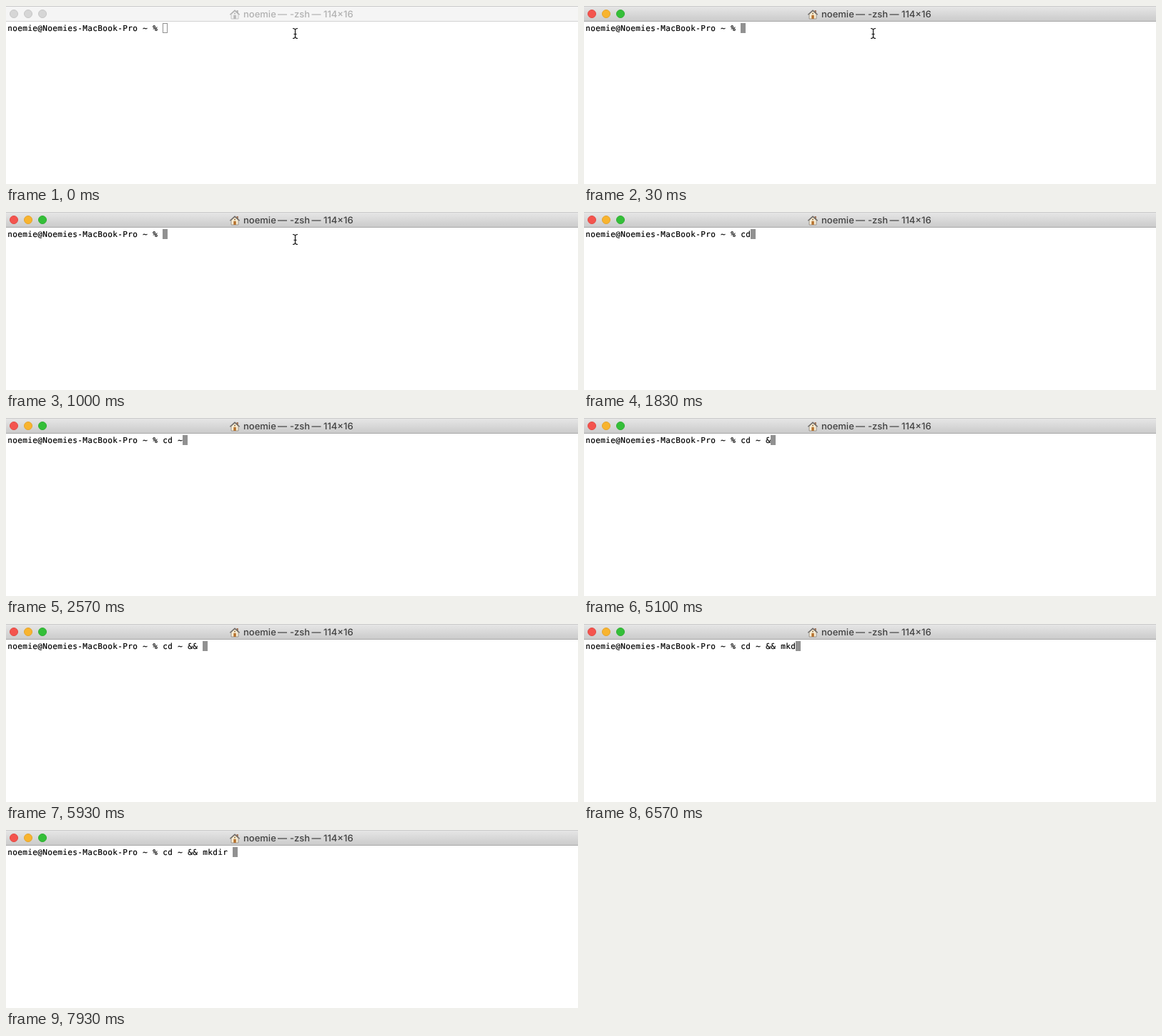
Recreate the animation shown at these times as an HTML page. Size 800 by 250 pixels, loop 8000 ms.

```html
<!DOCTYPE html>
<html lang="en">
<head>
<meta charset="utf-8">
<title>Terminal</title>
<style>
  html, body { margin: 0; height: 100%; overflow: hidden; background: #fff; }
  svg { display: block; text-rendering: geometricPrecision; }
  .title { font: 500 13px Inter, "Liberation Sans", sans-serif; fill: #414141; }
  .line {
    font: 11px "DejaVu Sans Mono", monospace; letter-spacing: .378px;
    white-space: pre; fill: #000; stroke: #000; stroke-width: .2;
  }
  #cursor { fill: #919191; stroke: #919191; }
  .inactive .bar { fill: #f5f5f5; }
  .inactive .edge { fill: #d2d2d2; }
  .inactive .title { fill: #b1b1b1; }
  .inactive .light { fill: #d6d6d6; stroke: #c6c6c6; }
  .inactive .icon { filter: grayscale(1); opacity: .5; }
  .inactive #cursor { fill: #fff; }
</style>
</head>
<body>
<svg id="stage" width="800" height="250" viewBox="0 0 800 250">
  <defs>
    <linearGradient id="metal" x2="0" y2="1">
      <stop stop-color="#e7e7e7"/>
      <stop offset="1" stop-color="#cbcbcb"/>
    </linearGradient>
  </defs>

  <rect class="bar" width="800" height="21" fill="url(#metal)"/>
  <rect width="800" height="1" fill="#cacaca"/>
  <rect class="edge" y="21" width="800" height="1" fill="#a9a9a9"/>
  <circle class="light" cx="11" cy="11" r="5.5" fill="#f4544e" stroke="#e34a44"/>
  <circle class="light" cx="31" cy="11" r="5.5" fill="#f8b42f" stroke="#e5a42b"/>
  <circle class="light" cx="51" cy="11" r="5.5" fill="#34bf38" stroke="#2fae32"/>

  <g class="icon">
    <path d="M322.5 6h2.2v5h-2.2z" fill="#9b6b4c"/>
    <path d="M315 11.5 320 7l5 4.500V18h-10z" fill="#f8ecd2" stroke="#8c8780" stroke-width=".8"/>
    <path d="M313.300 12.300 320 6.200l6.700 6.100" fill="none" stroke="#6d6a68" stroke-width="1.300"/>
    <path d="M318.300 12.800h3.400V18h-3.400z" fill="#b5702c"/>
    <circle cx="320" cy="10.400" r="1" fill="#8a6a45"/>
  </g>

  <text class="title" y="16"><tspan x="332">noemie</tspan><tspan x="380">—</tspan><tspan x="397">-zsh</tspan><tspan x="427.500">—</tspan><tspan x="444">114×16</tspan></text>

  <text id="line" class="line" x="2.200" y="35"></text>
  <rect id="cursor" y="24.500" width="6" height="13"/>
  <path id="pointer" d="M401 31.500q3.500 0 3.500 2.500v9q0 2.500-3.500 2.500M408 31.500q-3.500 0-3.500 2.500M404.500 43q0 2.500 3.500 2.500M402.500 39.500h4" fill="none" stroke="#111" stroke-width="1.200"/>
</svg>

<script>
const LOOP = 8000, FOCUS = 30, CELL = 7;
const prompt = "noemie@Noemies-MacBook-Pro ~ % ";
const command = "cd ~ && mkdir ";
// Time at which each character of the command is typed
const keys = [1370, 1570, 1900, 2270, 4570, 4900, 5200, 5400,
              6030, 6270, 6470, 6830, 7030, 7230];
const [stage, line, cursor, pointer] =
  ["stage", "line", "cursor", "pointer"].map(id => document.getElementById(id));

function draw(time) {
  const typed = keys.filter(key => time >= key).length;
  const text = prompt + command.slice(0, typed);
  stage.classList.toggle("inactive", time < FOCUS);
  if (line.textContent !== text) line.textContent = text;
  cursor.setAttribute("x", 2.5 + text.length * CELL);
  pointer.style.visibility = typed ? "hidden" : "visible";
}

const start = performance.now();
function tick() {
  draw((performance.now() - start) % LOOP);
  requestAnimationFrame(tick);
}
tick();
</script>
</body>
</html>
```
